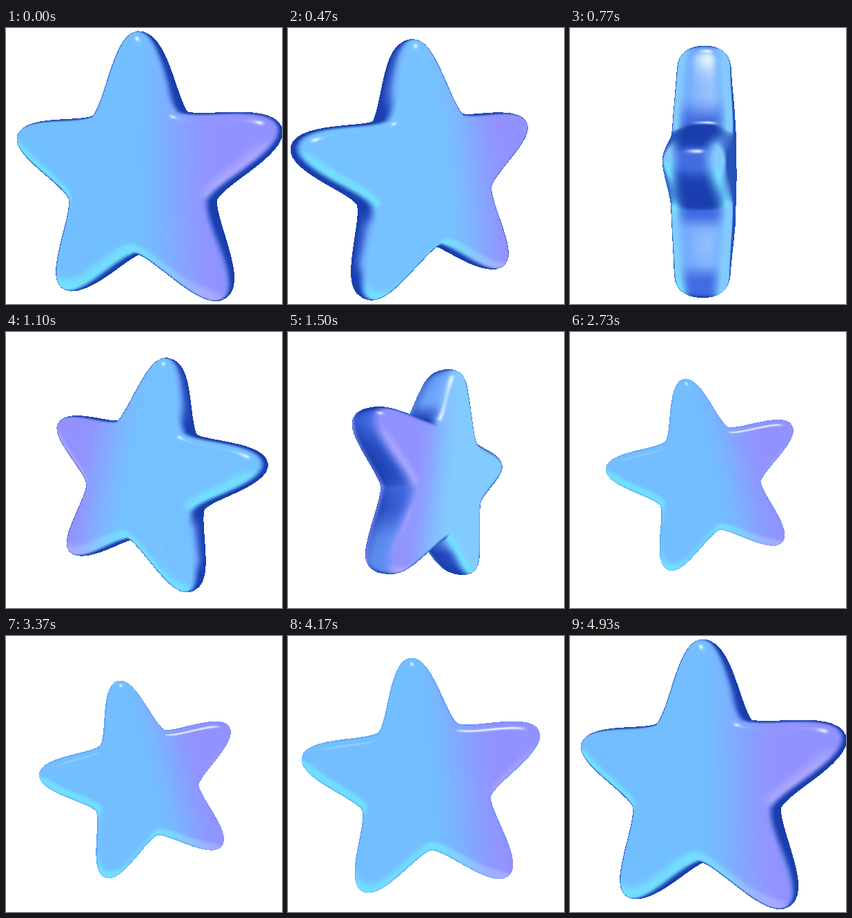
These frames come from a looping animation (400x400 px, 4.96 s). An HTML page with a canvas:

```html
<!DOCTYPE html>
<html lang="en">
<head>
<meta charset="utf-8">
<title>Glass star</title>
<style>
html, body { margin: 0; width: 100%; height: 100%; overflow: hidden; background: #fff; }
canvas { display: block; width: 400px; height: 400px; }
</style>
</head>
<body>
<canvas id="stage" width="400" height="400"></canvas>
<script>
const SIZE = 400, LOOP = 4960, CAMERA = 4, RAD = Math.PI / 180;
const ctx = document.getElementById('stage').getContext('2d');
const image = ctx.createImageData(SIZE, SIZE);
const depth = new Float32Array(SIZE * SIZE);

const mix = (a, b, t) => a + (b - a) * t;
const smooth = (a, b, v) => {
  const t = Math.min(1, Math.max(0, (v - a) / (b - a)));
  return t * t * (3 - 2 * t);
};
const blend = (a, b, t) => [mix(a[0], b[0], t), mix(a[1], b[1], t), mix(a[2], b[2], t)];
const bezier = (a, b, c, d, t) => {
  const q = 1 - t;
  return q * q * q * a + 3 * q * q * t * b + 3 * q * t * t * c + t * t * t * d;
};

// time, yaw, roll, radius, centre x, centre y
const KEYS = [
  [0, -20, .3, 208, 197, 214],
  [570, 42, 9, 189, 195, 211],
  [770, 84.5, 13, 178, 197, 209],
  [1500, 234, 10, 165, 213, 212],
  [2130, 342, 11, 148, 199, 210],
  [3370, 364, 14.3, 148, 198, 210],
  [4170, 359, 6.3, 180, 197, 212],
  [LOOP, 340, .3, 208, 197, 214]
];

function slope(i, channel) {
  if (i === 0 || i === KEYS.length - 1) return 0;
  const a = KEYS[i - 1], b = KEYS[i + 1];
  return (b[channel] - a[channel]) / (b[0] - a[0]);
}

function pose(time) {
  let i = 0;
  while (time >= KEYS[i + 1][0]) i++;
  const a = KEYS[i], b = KEYS[i + 1], span = b[0] - a[0], t = (time - a[0]) / span;
  return [1, 2, 3, 4, 5].map(c => bezier(
    a[c], a[c] + slope(i, c) * span / 3,
    b[c] - slope(i + 1, c) * span / 3, b[c], t));
}

// Star mesh: rows run from the front centre over the rim to the back centre.
const HALF = 14, COLS = HALF * 10, ARC = 20;
const rows = [];
for (const k of [0, 1 / 3, 2 / 3]) rows.push([k, 90]);
for (let i = 0; i <= ARC; i++) rows.push([1, 90 - 180 * i / ARC]);
for (const k of [2 / 3, 1 / 3, 0]) rows.push([k, -90]);

function outline(col, xs, ys) {
  const arm = Math.round(col / (2 * HALF)), step = col - arm * 2 * HALF;
  const t = Math.abs(step) / HALF, side = Math.sign(step);
  const d = bezier(...xs, t), w = bezier(...ys, t) * side;
  const a = (90 + 72 * arm) * RAD, c = Math.cos(a), s = Math.sin(a);
  return [d * c - w * s, d * s + w * c];
}

function surface(row, col) {
  const [k, angle] = rows[row], a = angle * RAD;
  const outer = outline(col, [1, 1, .54, .437], [0, .175, .225, .317]);
  const inner = outline(col, [.8, .8, .42, .33], [0, .05, .13, .24]);
  const spread = Math.pow(Math.max(0, Math.cos(a)), .8);
  const rise = Math.sign(a) * Math.pow(Math.abs(Math.sin(a)), .85);
  const rim = .235 * (1 - .1 * smooth(.5, 1, Math.hypot(...outer)));
  return [
    mix(inner[0], outer[0], spread) * k,
    mix(inner[1], outer[1], spread) * k,
    mix(.24, rim, k * k) * rise
  ];
}

const points = rows.map((r, i) => Array.from({ length: COLS }, (v, j) => surface(i, j)));
const last = rows.length - 1;

function normal(i, j) {
  if (i === 0 || i === last) return [0, 0, i ? -1 : 1];
  const sub = (a, b) => a.map((v, n) => v - b[n]);
  const u = sub(points[i + 1][j], points[i - 1][j]);
  const v = sub(points[i][(j + 1) % COLS], points[i][(j + COLS - 1) % COLS]);
  const n = [u[1] * v[2] - u[2] * v[1], u[2] * v[0] - u[0] * v[2], u[0] * v[1] - u[1] * v[0]];
  const len = Math.hypot(...n) || 1;
  return n.map(c => c / len);
}

const mesh = points.flatMap((row, i) => row.map((p, j) => ({ p, n: normal(i, j) })));

const BLUE = [114, 190, 255], VIOLET = [146, 146, 255], CYAN = [114, 224, 255];
const PINK = [172, 168, 255], RIM = [78, 142, 240], NAVY = [26, 62, 176], MID = [68, 108, 226];
const SKY = [112, 168, 252], PALE = [142, 212, 255], EDGE = [24, 62, 170], WHITE = [236, 252, 255];

// n: normal seen from the camera; x, y: place on the star; w: facing of the star's own plane
function shade(nx, ny, nz, x, y, w, turn) {
  const len = Math.hypot(nx, ny, nz) || 1;
  nx /= len; ny /= len; nz /= len;
  const u = smooth(0, .6, x), glass = smooth(.05, .35, turn);
  let c = blend(BLUE, VIOLET, u);
  c = blend(c, PALE, .6 * smooth(.3, .8, turn) * (1 - u));
  c = blend(c, blend(CYAN, PINK, u), .9 * smooth(.1, .5, -ny * .85 - nx * .25));
  c = blend(c, RIM, .8 * smooth(.5, .1, nz));

  const light = Math.max(smooth(.45, .65, y), x < .12
    ? smooth(.24, .1, Math.abs(y + .42))
    : .6 * smooth(-.3, -.6, y));
  const wall = smooth(.4, .9, 1 - Math.abs(w)) * glass;
  const deep = blend(NAVY, MID, smooth(.45, .95, nz));
  c = blend(c, blend(deep, SKY, light * smooth(.3, .8, nz)), wall);
  c = blend(c, EDGE, .8 * smooth(.55, .1, nz) * glass);

  const bevelShine = Math.pow(Math.max(0, ny * .52 + nz * .854), 130);
  const wallShine = Math.pow(Math.max(0, ny * .3 + nz * .954), 50) * wall * light;
  return blend(c, WHITE, .9 * Math.max(bevelShine, wallShine));
}

function triangle(a, b, c, turn) {
  const area = (b[0] - a[0]) * (c[1] - a[1]) - (b[1] - a[1]) * (c[0] - a[0]);
  if (Math.abs(area) < 1e-6) return;
  const x0 = Math.max(0, Math.ceil(Math.min(a[0], b[0], c[0])));
  const x1 = Math.min(SIZE - 1, Math.floor(Math.max(a[0], b[0], c[0])));
  const y0 = Math.max(0, Math.ceil(Math.min(a[1], b[1], c[1])));
  const y1 = Math.min(SIZE - 1, Math.floor(Math.max(a[1], b[1], c[1])));
  for (let y = y0; y <= y1; y++) for (let x = x0; x <= x1; x++) {
    const v = ((x - a[0]) * (c[1] - a[1]) - (y - a[1]) * (c[0] - a[0])) / area;
    const w = ((b[0] - a[0]) * (y - a[1]) - (b[1] - a[1]) * (x - a[0])) / area;
    const u = 1 - v - w;
    if (u < -1e-6 || v < -1e-6 || w < -1e-6) continue;
    const at = k => u * a[k] + v * b[k] + w * c[k];
    const z = at(2), pixel = y * SIZE + x;
    if (z <= depth[pixel]) continue;
    depth[pixel] = z;
    const color = shade(at(3), at(4), at(5), at(6), at(7), at(8), turn);
    for (let k = 0; k < 3; k++) image.data[pixel * 4 + k] = color[k];
  }
}

function draw(time) {
  const [yaw, roll, radius, cx, cy] = pose(time);
  const c = Math.cos(yaw * RAD), s = Math.sin(yaw * RAD);
  const rc = Math.cos(roll * RAD), rs = Math.sin(roll * RAD);
  const turn = ([x, y, z]) => {
    const rx = x * rc - y * rs;
    return [rx * c + z * s, x * rs + y * rc, z * c - rx * s];
  };
  const verts = mesh.map(({ p, n }) => {
    const [x, y, z] = turn(p), scale = radius * CAMERA / (CAMERA - z);
    return [cx + x * scale, cy - y * scale, z, ...turn(n), p[0], p[1], n[2]];
  });
  image.data.fill(255);
  depth.fill(-9);
  for (let i = 0; i < last; i++) for (let j = 0; j < COLS; j++) {
    const k = (j + 1) % COLS, top = i * COLS, low = top + COLS;
    triangle(verts[top + j], verts[low + j], verts[low + k], Math.abs(s));
    triangle(verts[top + j], verts[low + k], verts[top + k], Math.abs(s));
  }
  ctx.putImageData(image, 0, 0);
}

const start = performance.now();
function tick() {
  draw((performance.now() - start) % LOOP);
  requestAnimationFrame(tick);
}
tick();
</script>
</body>
</html>
```
